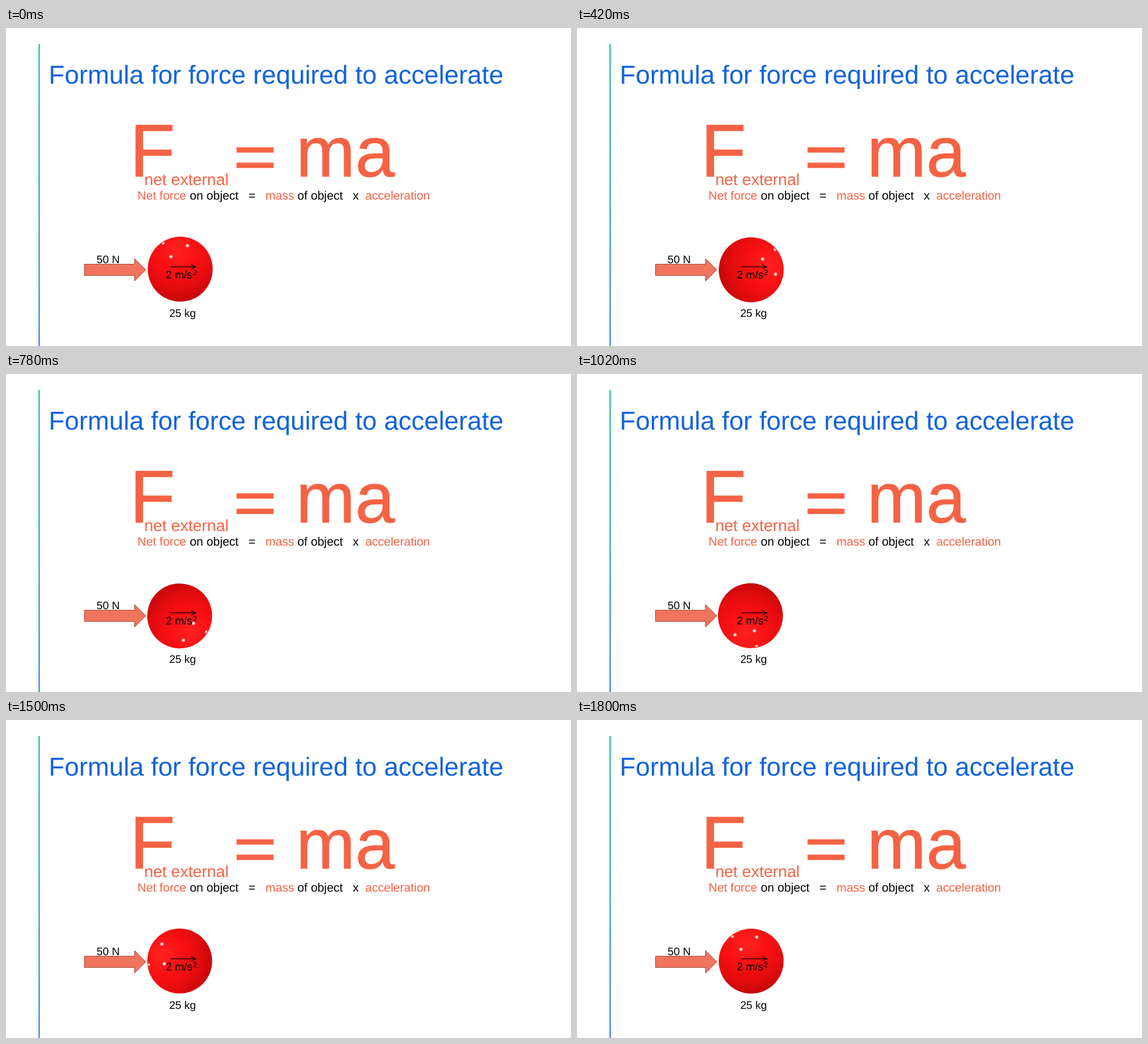
Recreate the animation shown at these times as an HTML page. Size 853 by 480 pixels, loop 1860 ms.

```html
<!DOCTYPE html>
<html lang="en">
<head>
<meta charset="utf-8">
<title>Force, mass and acceleration</title>
<style>
  html, body { margin: 0; width: 100%; height: 100%; overflow: hidden; background: #fff; }
  svg { display: block; width: 853px; height: 480px; }
  text { font-family: "Liberation Sans", Arial, sans-serif; text-rendering: geometricPrecision; white-space: pre; }
  .title { font-size: 39.1px; fill: #1062de; }
  .coral { fill: #f56244; }
  .big { stroke: #f56244; stroke-width: .8; }
  .words { font-size: 18.15px; }
  .label { font-size: 16.5px; }
</style>
</head>
<body>
<svg viewBox="0 0 853 480">
  <defs>
    <linearGradient id="rule" x1="0" y1="0" x2="0" y2="1">
      <stop offset="0" stop-color="#2fc4a6"/>
      <stop offset=".5" stop-color="#32aec4"/>
      <stop offset="1" stop-color="#4a84e2"/>
    </linearGradient>
    <radialGradient id="red" cx=".46" cy=".22" r=".8">
      <stop offset="0" stop-color="#ff2220"/>
      <stop offset=".4" stop-color="#f91013"/>
      <stop offset=".7" stop-color="#e60b0e"/>
      <stop offset="1" stop-color="#c2080b"/>
    </radialGradient>
    <radialGradient id="glint">
      <stop offset="0" stop-color="#fff"/>
      <stop offset=".4" stop-color="#ffe4e0"/>
      <stop offset="1" stop-color="#ff5a50" stop-opacity="0"/>
    </radialGradient>
  </defs>

  <rect x="49" y="24" width="2" height="456" fill="url(#rule)"/>
  <text class="title" x="64.6" y="84">Formula for force required to accelerate</text>

  <g class="coral">
    <g class="big">
      <text x="186.7" y="223.6" font-size="112.5">F</text>
      <path d="M348.4 180.6h55.2v7.2h-55.2zM348.4 203.7h55.2v7.2h-55.2z"/>
      <text x="437.8" y="223.8" font-size="107.3">ma</text>
    </g>
    <text x="208.7" y="237" font-size="24.4">net external</text>
  </g>

  <g class="words">
    <text class="coral" x="198.6" y="259">Net force</text>
    <text x="277.5" y="259">on object</text>
    <text x="366" y="259">=</text>
    <text class="coral" x="391.8" y="259">mass</text>
    <text x="440" y="259">of object</text>
    <text x="523.5" y="259">x</text>
    <text class="coral" x="542.4" y="259">acceleration</text>
  </g>

  <path d="M118.5 356.5H194V348L211 365L194 382V373.5H118.5Z" fill="#f0745e" stroke="#b0533f"/>

  <!-- The ball sits slightly off its pivot, so it wobbles as it turns. -->
  <g id="ball">
    <circle cx=".5" cy="-.5" r="49" fill="url(#red)"/>
    <g fill="url(#glint)">
      <circle cx="11.5" cy="-36" r="3.6"/>
      <circle cx="-13.5" cy="-19.5" r="3.6"/>
      <ellipse cx="-25" cy="-39.5" rx="3.4" ry="2.2" transform="rotate(-32 -25 -39.5)"/>
    </g>
  </g>

  <path d="M248 360.5H286M279.5 357L286.5 360.5L279.5 364" fill="none" stroke="#000" stroke-width="1.2"/>
  <g class="label">
    <text x="136.8" y="354.6">50 N</text>
    <text x="241.2" y="378">2 m/s<tspan x="282" y="373.3" font-size="11.5">2</tspan></text>
    <text x="246.4" y="436">25 kg</text>
  </g>
</svg>
<script>
  const STEP = 60, LOOP = 1860, TURN = 11.86;
  const ball = document.getElementById("ball");

  function draw() {
    const step = Math.floor(performance.now() % LOOP / STEP);
    ball.setAttribute("transform", `translate(262.5 364.5) rotate(${step * TURN})`);
    requestAnimationFrame(draw);
  }
  draw();
</script>
</body>
</html>
```
